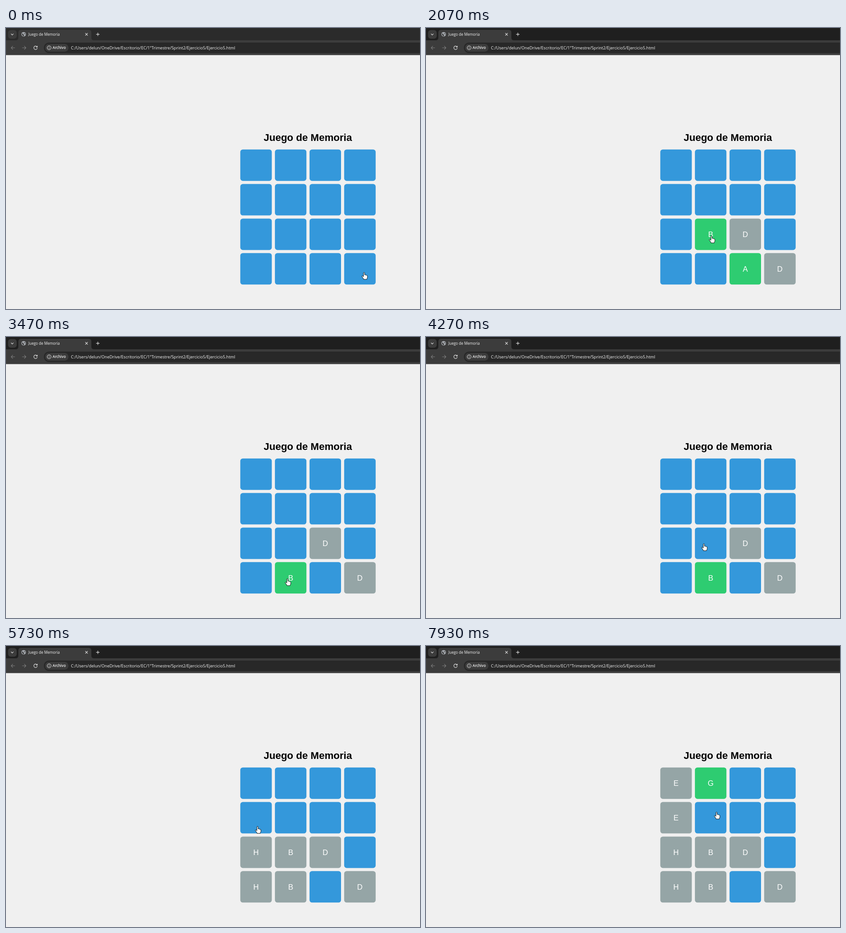
An HTML page for the animation above (8000 ms loop, 907 px wide and 617 px high).

```html
<!DOCTYPE html>
<html lang="es">
<head>
<meta charset="utf-8">
<title>Juego de Memoria</title>
<style>
  html, body { margin: 0; width: 100%; height: 100%; overflow: hidden; background: #f0f0f0; }
  svg { display: block; }
  text { font-family: "Open Sans", "Noto Sans", sans-serif; fill: #f4f4f4; }
  .page text { font-family: "Liberation Sans", Arial, sans-serif; text-anchor: middle; }
  .page .title { font-size: 22.06px; font-weight: bold; fill: #000; }
  .page .letter { font-size: 16.55px; fill: #fff; }
  .line { fill: none; stroke: #e3e3e3; stroke-width: 1.1; }
  .dim { stroke: #7b7b7b; }
</style>
</head>
<body>
<svg width="907" height="617" viewBox="0 0 907 617">
  <rect id="strip" width="907" height="30"/>
  <rect x="4.5" y="4.5" width="19" height="19" rx="6" fill="#3c3c3c"/>
  <path class="line" d="M11 12.7l2.7 2.7 2.7-2.7"/>
  <path fill="#3c3c3c" d="M0 27H21q6 0 6-6V10q0-6 6-6H181q6 0 6 6V21q0 6 6 6H907V59.600H0z"/>
  <circle cx="38.7" cy="13.8" r="4.9" fill="#a9adb2"/>
  <path fill="#3c3c3c" d="M35 12q3 0 3.200 2t2 2.200l-1.500 1.800q-3.700-1-3.700-6zM38.500 10q1 2 3 1.500l1 2.500q-2 0-2.500-1.500t-1.500-2.500z"/>
  <text x="49" y="16.9" font-size="8.1">Juego de Memoria</text>
  <path class="line" d="M173.700 11.200l5.400 5.400m0-5.400l-5.400 5.400M197.500 13.900h7.400m-3.700-3.700v7.400"/>
  <path class="line dim" d="M19.500 43.500h-8m3.600-3.800l-3.800 3.800 3.800 3.800M35.500 43.500h8m-3.600-3.800l3.800 3.800-3.800 3.800"/>
  <path class="line" d="M68 41.500a3.800 3.800 0 1 0 .5 2.500M68.600 39.200v2.700h-2.700"/>
  <rect x="83" y="32" width="840" height="23" rx="11.5" fill="#282828"/>
  <rect x="85.5" y="35" width="51.5" height="17" rx="8.5" fill="#3c3c3c"/>
  <circle class="line" cx="94.5" cy="43.5" r="4.2"/>
  <path class="line" d="M94.500 42.900v2.800M94.500 41v1.100"/>
  <text x="102" y="46.4" font-size="8" font-weight="600">Archivo</text>
  <text x="142.3" y="46.8" font-size="9.13">C:/Users/delun/OneDrive/Escritorio/EC/1ºTrimestre/Sprint2/Ejercicio5/Ejercicio5.html</text>
  <g class="page">
    <text class="title" x="661.2" y="247.8">Juego de Memoria</text>
    <g id="board"></g>
  </g>
  <path id="hand" fill="#fff" stroke="#000" stroke-width=".9" stroke-linejoin="round"
    d="M-1.800 2V-6.100a1.300 1.300 0 0 1 2.600 0V-2q2-.6 2.300.6q2-.5 2.200.7q1.600-.3 1.600 1.200V3.200q0 2-1.300 3.500V7.900H-1.700V6.700L-5.100 1.800q-.8-1.300.3-1.600q1-.2 3 1.800z"/>
</svg>
<script>
const TICK = 1000 / 15, TICKS = 120, TRAVEL = 5, HIDE_DELAY = 15;
const LEFT = 513.3, TOP = 266.7, SIZE = 69, PITCH = 75.85;
const BLUE = '#3498db', GREEN = '#2ecc71', GRAY = '#95a5a6';

// Pointer stops: tick, x, y and, for a click, the letter it reveals
const stops = [
  [0, 785, 544],
  [5, 776, 543, 'D'], [12, 703, 458, 'D'],
  [16, 731, 513],
  [25, 725, 543, 'A'], [31, 626, 464, 'B'],
  [52, 617, 538, 'B'],
  [60, 559, 455],
  [68, 615, 462, 'B'],
  [73, 559, 522, 'H'], [82, 556, 468, 'H'],
  [94, 551, 396, 'E'], [103, 560, 315, 'E'],
  [115, 607, 321, 'G'],
  [119, 637, 372]
];
const clicks = stops.filter(stop => stop[3]);

const byId = id => document.getElementById(id);
const add = (tag, attrs) => {
  const el = document.createElementNS('http://www.w3.org/2000/svg', tag);
  for (const key in attrs) el.setAttribute(key, attrs[key]);
  return byId('board').appendChild(el);
};

const cards = Array.from({ length: 16 }, (_, i) => {
  const x = LEFT + PITCH * (i % 4), y = TOP + PITCH * (i >> 2);
  return {
    face: add('rect', { x, y, width: SIZE, height: SIZE, rx: 5.5 }),
    label: add('text', { class: 'letter', x: x + SIZE / 2, y: y + SIZE / 2 + 5.9 })
  };
});

const cardAt = (x, y) => Math.floor((x - LEFT) / PITCH) + 4 * Math.floor((y - TOP) / PITCH);

// Replays the clicks in pairs: equal letters stay gray, others turn back
function boardAt(tick) {
  const board = {};
  clicks.forEach(([at, x, y, letter], i) => {
    if (tick < at) return;
    const pair = clicks[i ^ 1], pairTick = pair ? Math.max(at, pair[0]) : Infinity;
    const matched = pair && pair[3] === letter;
    if (!matched && tick >= pairTick + HIDE_DELAY) return;
    board[cardAt(x, y)] = { letter, color: matched && tick >= pairTick ? GRAY : GREEN };
  });
  return board;
}

// The pointer leaves each stop at once and rests before the next one
function pointerAt(tick) {
  const next = stops.findIndex(stop => stop[0] > tick);
  const [t0, x0, y0] = stops.at(next < 0 ? -1 : next - 1);
  if (next < 0) return [x0, y0];
  const [t1, x1, y1] = stops[next];
  const u = Math.min(1, (tick - t0) / Math.min(TRAVEL, t1 - t0 - 1));
  const eased = u * u * (3 - 2 * u);
  return [x0 + (x1 - x0) * eased, y0 + (y1 - y0) * eased];
}

function draw(ms) {
  const tick = Math.floor((ms + 3.4) / TICK) % TICKS;
  const board = boardAt(tick);
  byId('strip').setAttribute('fill', tick < clicks[0][0] ? '#2b2b2b' : '#1f1f1f');
  cards.forEach(({ face, label }, i) => {
    const { letter = '', color = BLUE } = board[i] || {};
    face.setAttribute('fill', color);
    label.textContent = letter;
  });
  byId('hand').setAttribute('transform', `translate(${pointerAt(tick)})`);
}

const start = performance.now();
function frame() {
  draw((performance.now() - start) % (TICK * TICKS));
  requestAnimationFrame(frame);
}
frame();
</script>
</body>
</html>
```
